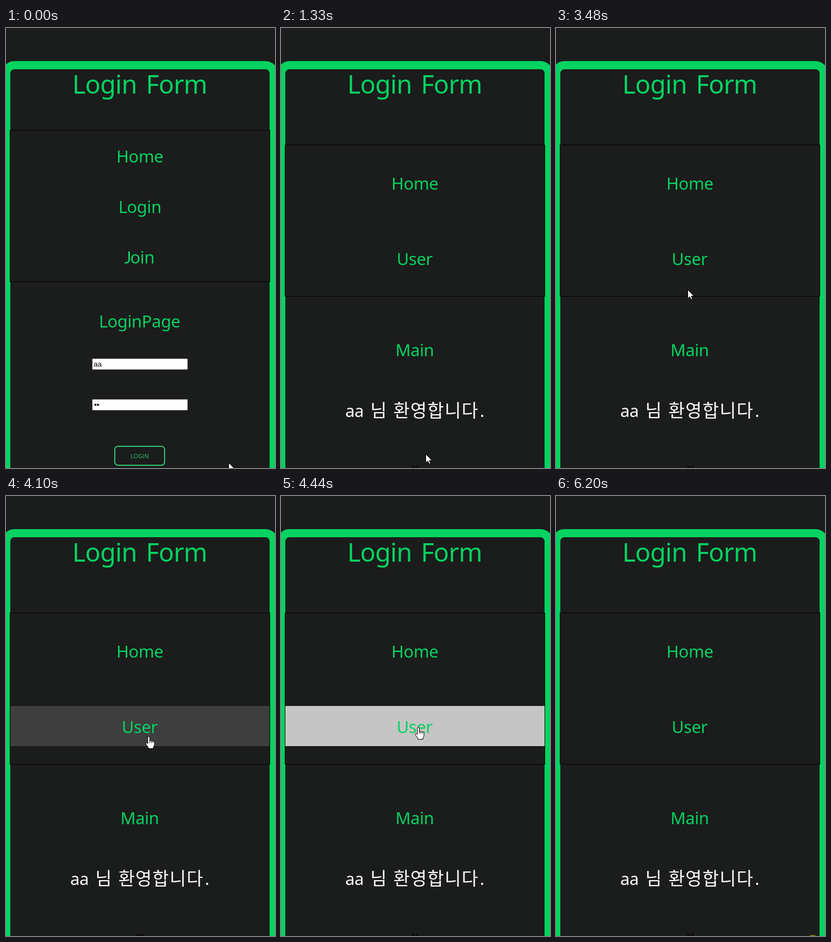
These frames come from a looping animation (497 px wide and 811 px high, 6330 ms). An HTML page:

```html
<!DOCTYPE html>
<html lang="ko">
<head>
<meta charset="utf-8">
<title>Login Form</title>
<style>
  html, body { margin: 0; width: 100%; height: 100%; overflow: hidden; background: #1b1c1c; }
  svg { display: block; width: 497px; height: 811px; }
  text { font-family: "Noto Sans", "Open Sans", sans-serif; font-size: 31px; letter-spacing: -0.4px; fill: #04d361; }
  .mid { text-anchor: middle; }
  .title { font-size: 47px; letter-spacing: -0.8px; word-spacing: 5.4px; }
  .lato { font-family: Lato, sans-serif; }
  .white { fill: #fff; }
  .hangul { font-family: "Noto Sans CJK KR", "Noto Sans CJK", sans-serif; font-size: 33px; letter-spacing: 1.2px; fill: #fff; }
  .field { font-family: "Liberation Sans", Arial, sans-serif; font-size: 13.33px; letter-spacing: 0; fill: #000; }
  .label { font-family: "Open Sans", sans-serif; font-size: 11px; letter-spacing: 0; }
  .nav { fill: none; stroke: #000; }
  .input { fill: #fff; stroke: #767676; }
  .pointer { fill: #fff; stroke: #000; stroke-linejoin: round; }
</style>
</head>
<body>
<svg viewBox="0 0 497 811">
  <rect width="497" height="811" fill="#1b1c1c"/>
  <rect x="0.5" y="68.5" width="494" height="900" rx="15" fill="none" stroke="#04d361" stroke-width="15"/>
  <text class="mid title" x="247" y="120.5">Login Form</text>

  <g id="loginPage">
    <rect class="nav" x="7.5" y="188.5" width="480" height="279"/>
    <text class="mid" x="247.3" y="248">Home</text>
    <text class="mid" x="247.3" y="341">Login</text>
    <text class="lato" x="218.5" y="434">J</text>
    <text x="229.5" y="434">oin</text>
    <text class="mid" x="246.8" y="552">LoginPage</text>
    <rect class="input" x="159.5" y="609.5" width="176" height="20" rx="1"/>
    <text class="field" x="162" y="624">aa</text>
    <rect class="input" x="159.5" y="684.5" width="176" height="20" rx="1"/>
    <circle cx="165.2" cy="694.5" r="1.9"/>
    <circle cx="169.9" cy="694.5" r="1.9"/>
    <rect id="button" x="201" y="771" width="92" height="35" rx="6" fill="#2ecc71" fill-opacity="0" stroke="#2ecc71" stroke-width="2"/>
    <text id="label" class="mid label" x="247" y="793">LOGIN</text>
  </g>

  <g id="mainPage">
    <rect class="nav" x="7.5" y="215.5" width="480" height="279"/>
    <rect id="bar" x="8" y="387" width="479" height="74"/>
    <text class="mid" x="247.3" y="298">Home</text>
    <text class="mid" x="246.8" y="437">User</text>
    <text class="mid" x="247" y="605">Main</text>
    <text class="white" x="118.8" y="717">aa</text>
    <text class="hangul" x="165" y="717">님</text>
    <text class="hangul" x="207.5" y="717">환영합니다</text>
    <text class="white" x="367.5" y="717">.</text>
    <text class="field" x="240.3" y="813.5">aa</text>
  </g>

  <circle id="glow" cx="474" cy="821" r="12" fill="#857d1b"/>
  <path id="arrow" class="pointer" d="M.5.5V16.6L4.2 13.1 6.7 18.6 9.2 17.5 6.8 12.1H12Z"/>
  <g id="hand" class="pointer">
    <path d="M-2 2a1.8 1.8 0 0 1 3.6 0V8q1.5-1 3 .3 1.6-.8 2.8.6 2.6-.5 2.8 1.6V15q0 3-2 5v2.5H-1V20.5L-5.5 14.5Q-6.5 12-4.2 11.8L-2 13.5Z"/>
    <path d="M1.6 8v4M4.6 8.5v3.5M7.4 9v3" fill="none"/>
  </g>
</svg>
<script>
  const LOOP = 6330;
  const SWAP = 1130;
  const BAR_ON = 3963;
  const BAR_OFF = 5460;

  // Pointer path: [ms, x, y]
  const path = [
    [0, 411, 801], [60, 411, 801], [250, 290, 789], [470, 267, 785],
    [1640, 267, 785], [1730, 268, 765],
    [1880, 268, 765], [2340, 315, 615],
    [2490, 315, 615], [2820, 239, 462],
    [3440, 239, 462], [3475, 243, 482], [3540, 243, 482], [3650, 250, 558], [3800, 258, 520],
    [3963, 264, 460], [4095, 264, 443],
    [4150, 264, 443], [4280, 254, 425.5],
    [5420, 254, 425.5], [5460, 270, 470], [5730, 470, 815], [LOOP, 470, 815]
  ];

  const el = id => document.getElementById(id);
  const [loginPage, mainPage, button, label, bar, glow, arrow, hand] =
    ["loginPage", "mainPage", "button", "label", "bar", "glow", "arrow", "hand"].map(el);

  const clamp = v => Math.max(0, Math.min(1, v));
  const mix = (a, b, k) => a + (b - a) * k;
  const show = (node, on) => node.setAttribute("display", on ? "inline" : "none");
  const gray = v => `rgb(${v},${v},${v})`;

  // CSS "ease": cubic-bezier(.25, .1, .25, 1)
  function ease(x) {
    const curve = (a, b, s) => 3 * (1 - s) * (1 - s) * s * a + 3 * (1 - s) * s * s * b + s * s * s;
    let lo = 0, hi = 1;
    for (let i = 0; i < 20; i++) {
      const s = (lo + hi) / 2;
      if (curve(.25, .25, s) < x) lo = s; else hi = s;
    }
    return curve(.1, 1, lo);
  }

  const fade = (t, start, length) => ease(clamp((t - start) / length));

  function pointerAt(t) {
    const i = path.findIndex(p => p[0] > t);
    const [a, b] = [path[i - 1], path[i]];
    const k = (t - a[0]) / (b[0] - a[0]);
    return [Math.round(mix(a[1], b[1], k)), Math.round(mix(a[2], b[2], k))];
  }

  function draw(t) {
    show(loginPage, t < SWAP);
    show(mainPage, t >= SWAP);

    const fill = fade(t, 230, 220);
    button.setAttribute("fill-opacity", fill);
    label.style.fill = `rgb(${mix(46, 255, fill)},${mix(204, 255, fill)},${mix(113, 255, fill)})`;

    const hover = t >= BAR_ON && t < BAR_OFF;
    show(bar, hover);
    bar.setAttribute("fill", gray(Math.round(mix(27, 245, fade(t, BAR_ON, 1000)))));

    const [x, y] = pointerAt(t);
    const link = hover || (t >= 240 && t < 1330);
    const move = `translate(${x} ${y})`;
    arrow.setAttribute("transform", move);
    hand.setAttribute("transform", move);
    show(arrow, !link && t < 5730);
    show(hand, link);
    show(glow, t >= 6200);
  }

  const start = performance.now();
  function tick() {
    draw((performance.now() - start) % LOOP);
    requestAnimationFrame(tick);
  }
  draw(0);
  requestAnimationFrame(tick);
</script>
</body>
</html>
```
